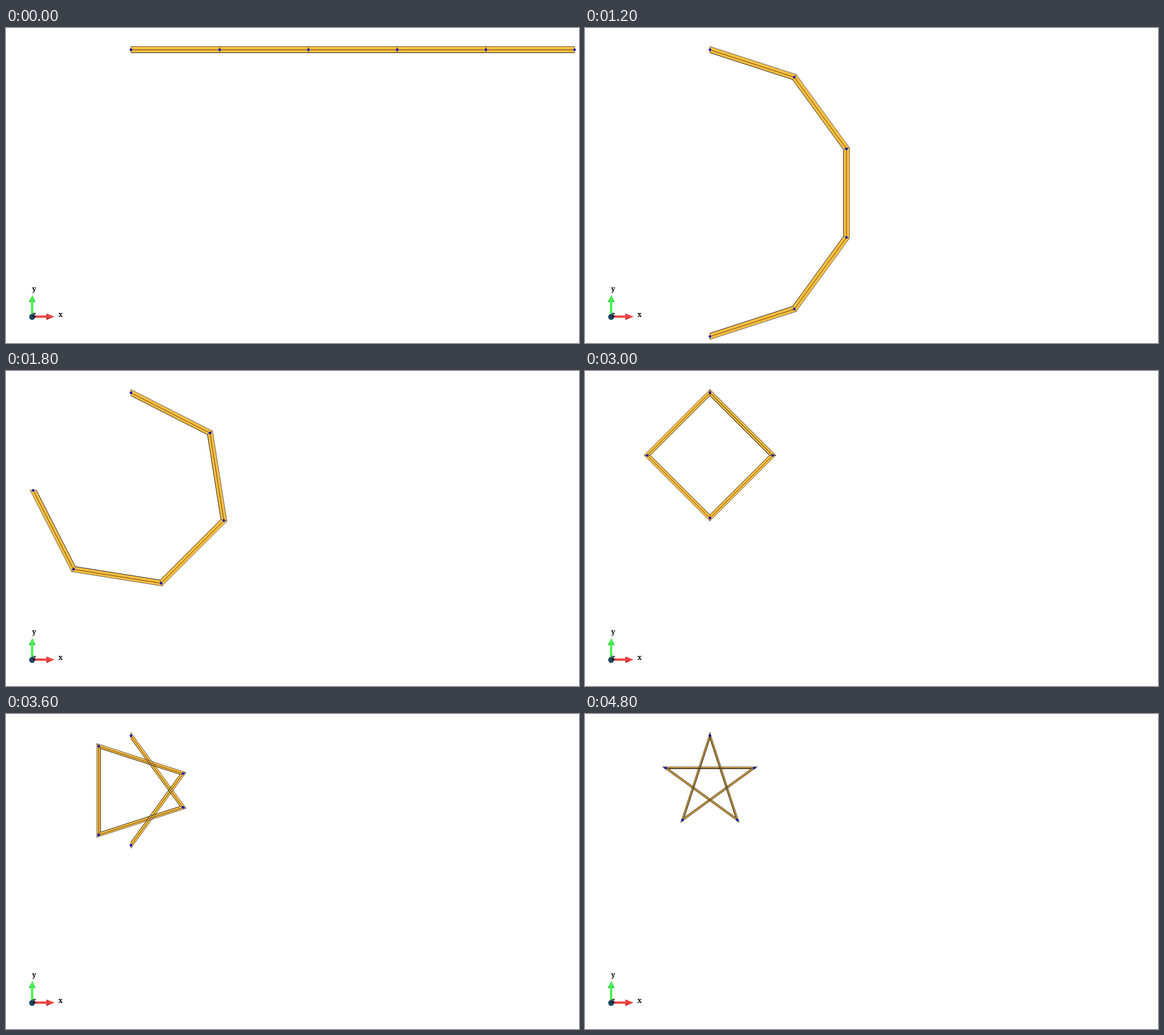
Animation of 1008x555 px, one loop 5400 ms. Source, as an HTML page:

```html
<!DOCTYPE html>
<html>
<head>
<meta charset="utf-8">
<style>
html, body { margin: 0; width: 100%; height: 100%; overflow: hidden; background: #fff; }
svg { display: block; }
text { font: bold 12px "Noto Serif", "Liberation Serif", serif; }
.line { fill: none; stroke-width: 1; }
</style>
</head>
<body>
<svg width="1008" height="555" viewBox="0 0 1008 555">
  <defs>
    <linearGradient id="green">
      <stop offset="0" stop-color="#1fa52c"/>
      <stop offset=".5" stop-color="#4dff55"/>
      <stop offset="1" stop-color="#22b830"/>
    </linearGradient>
    <linearGradient id="red" x2="0" y2="1">
      <stop offset="0" stop-color="#c82a2a"/>
      <stop offset=".45" stop-color="#fa4848"/>
      <stop offset="1" stop-color="#a51c1c"/>
    </linearGradient>
  </defs>
  <path id="fill" fill="#ffbf3f"/>
  <path id="outer" class="line" stroke="#626262"/>
  <path id="inner" class="line" stroke="#222"/>
  <path id="axis" class="line" stroke="#5a4318"/>
  <path id="nodes" fill="#1008d8"/>
  <path id="ticks" class="line" stroke="#222" stroke-opacity=".65"/>
  <path fill="url(#green)" d="M44 506V483H40L46.5 470L52 483H48V506Z"/>
  <path fill="url(#red)" d="M50 506.5H71V503L85.500 508.500L71 514.500V510.500H50Z"/>
  <circle cx="46" cy="509" r="5.2" fill="#1d465f"/>
  <text x="46" y="464">y</text>
  <text x="92" y="509">x</text>
  <text x="46.500" y="509" fill="#061018">z</text>
</svg>
<script>
const SEGMENTS = 5, LENGTH = 156.1, HALF = 5.5, STEP = 600, STEPS = 9;
const point = (x, y) => x.toFixed(2) + ' ' + y.toFixed(2);
const draw = (id, d) => document.getElementById(id).setAttribute('d', d);

// Each load step adds 18 degrees of bend per segment.
function render(step) {
  const bend = step * Math.PI / 10;
  const top = [], bottom = [], mid = [];
  let x = 219.8, y = 38.1, dots = '', ticks = '';
  for (let i = 0; i <= SEGMENTS; i++) {
    const nx = Math.sin(i * bend) * HALF, ny = -Math.cos(i * bend) * HALF;
    top.push(point(x + nx, y + ny));
    bottom.push(point(x - nx, y - ny));
    mid.push(point(x, y + 0.4));
    dots += `M${point(x - 2.3, y + 0.2)}a2.3 2.3 0 1 0 4.6 0a2.3 2.3 0 1 0 -4.6 0`;
    ticks += `M${top[i]}L${bottom[i]}`;
    const angle = (i + 0.5) * bend;
    x += LENGTH * Math.cos(angle);
    y += LENGTH * Math.sin(angle);
  }
  let fill = '';
  for (let i = 0; i < SEGMENTS; i++)
    fill += `M${top[i]}L${top[i + 1]}L${bottom[i + 1]}L${bottom[i]}Z`;
  draw('fill', fill);
  draw('outer', 'M' + top.join('L'));
  draw('inner', 'M' + bottom.join('L'));
  draw('axis', 'M' + mid.join('L'));
  draw('nodes', dots);
  draw('ticks', ticks);
}

const start = performance.now();
let shown = -1;
function frame() {
  const step = Math.floor((performance.now() - start) / STEP) % STEPS;
  if (step !== shown) render(shown = step);
  requestAnimationFrame(frame);
}
frame();
</script>
</body>
</html>
```
